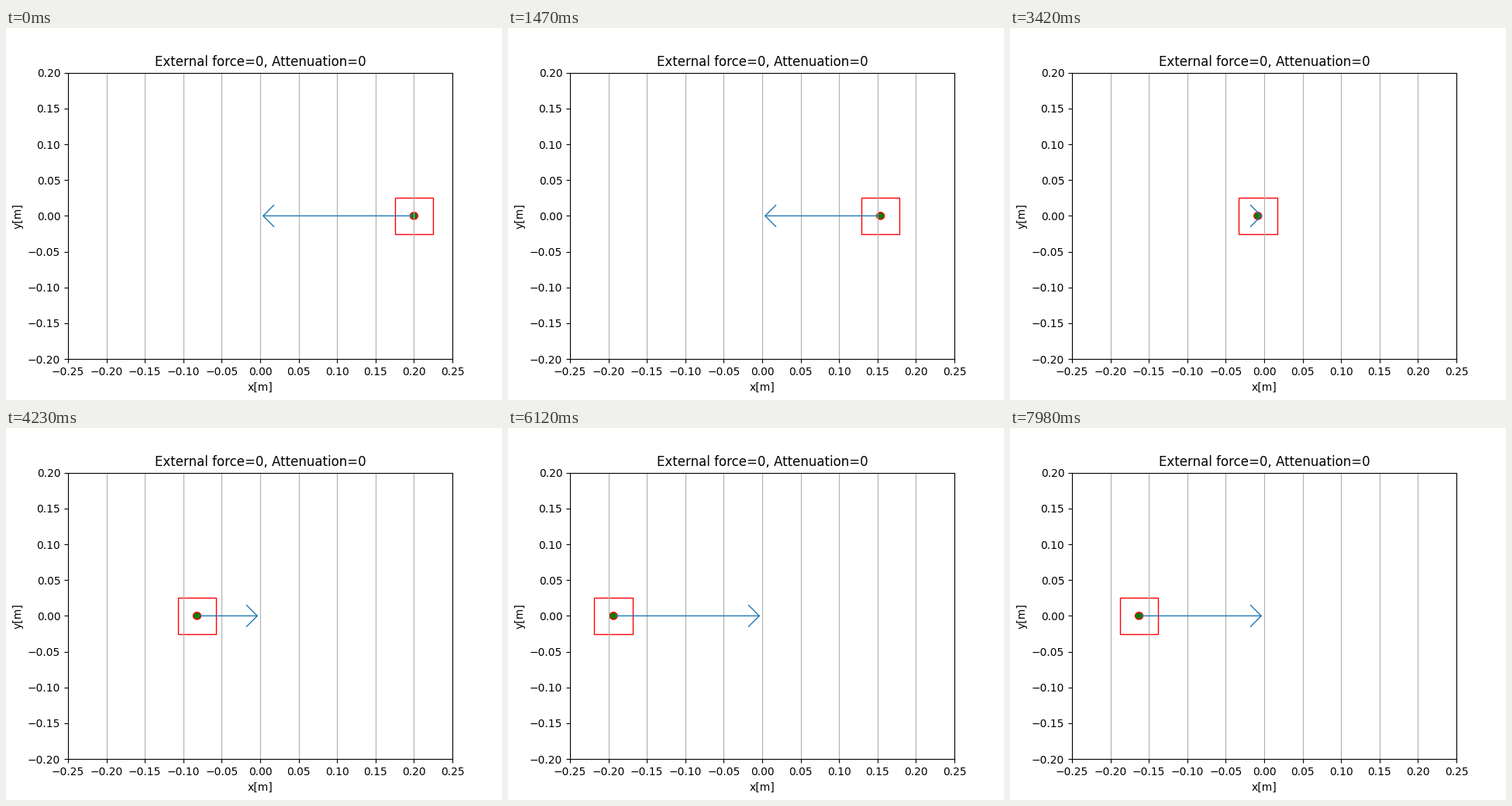
Animation of 640 by 480 pixels, one loop 8 s. Source, as a matplotlib script:

```python
import math

import matplotlib.pyplot as plt
from matplotlib.animation import FuncAnimation
from matplotlib.patches import Circle, Rectangle

LOOP_MS = 8000
FRAMES = 267
AMPLITUDE = 0.2
OMEGA = math.sqrt(2)  # sqrt(k / m)
DT = 0.01
SIDE = 0.05

fig, ax = plt.subplots(figsize=(6.4, 4.8), dpi=100)
ax.set_xlim(-0.25, 0.25)
ax.set_ylim(-0.2, 0.2)
ax.set_xticks([i * 0.05 for i in range(-5, 6)])
ax.set_xlabel("x[m]")
ax.set_ylabel("y[m]")
ax.set_title("External force=0, Attenuation=0")
ax.grid(axis="x")

box = ax.add_patch(Rectangle((0, -SIDE / 2), SIDE, SIDE, ec="r", fill=False))
mass = ax.add_patch(Circle((0, 0), 0.005, fc="g", ec="r"))
force = ax.annotate(
    "", xy=(0, 0), xytext=(AMPLITUDE, 0),
    arrowprops=dict(arrowstyle="->,head_length=1,head_width=1", color="C0"),
)


def update(frame):
    x = AMPLITUDE * math.cos(OMEGA * DT * frame)
    box.set_x(x - SIDE / 2)
    mass.center = (x, 0)
    force.set_position((x, 0))
    return box, mass, force


anim = FuncAnimation(fig, update, frames=FRAMES, interval=LOOP_MS / FRAMES,
                     init_func=lambda: update(0), repeat=True, repeat_delay=0)
plt.show()
```
